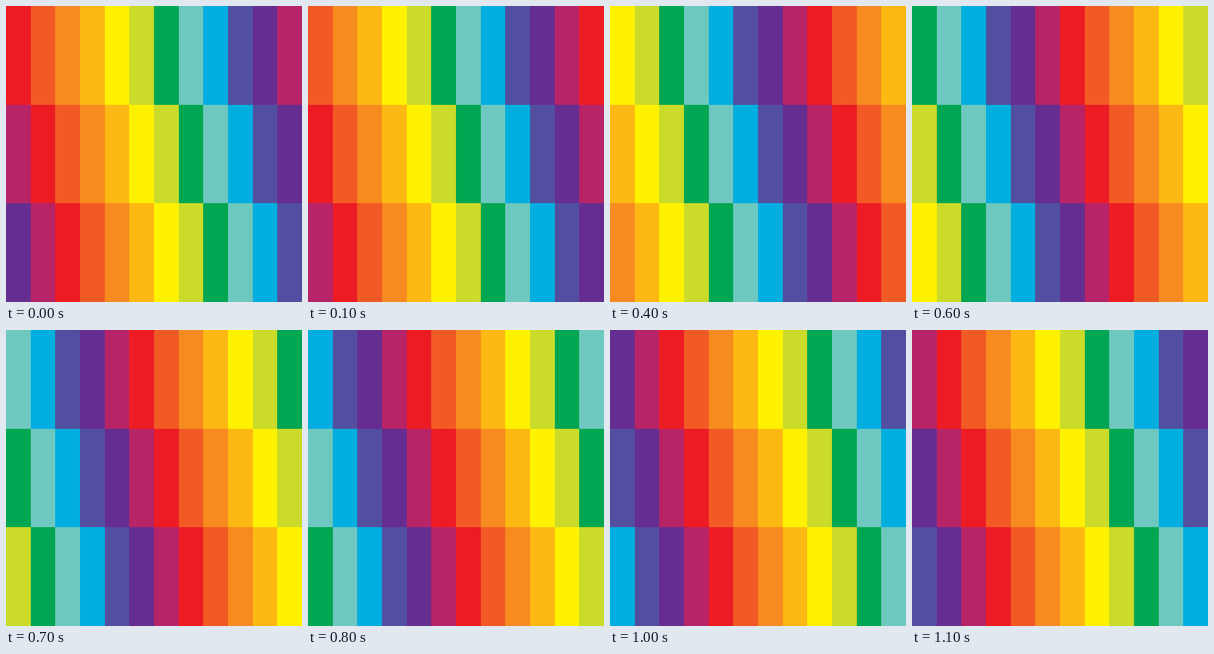
Animation of 500x500 px, one loop 1200 ms. Source, as an HTML page with a canvas:

```html
<!DOCTYPE html>
<html lang="en">
<head>
<meta charset="utf-8">
<title>Rainbow shift</title>
<style>
  html, body { margin: 0; width: 100%; height: 100%; overflow: hidden; }
  canvas { display: block; }
</style>
</head>
<body>
<canvas id="stage" width="500" height="500"></canvas>
<script>
const SIZE = 500, ROWS = 3, STEP_MS = 100;
const colors = [
  '#ed1c24', '#f15a24', '#f68b1f', '#fdb813', '#fff200', '#cadb2a',
  '#00a651', '#6dc8bf', '#00aee0', '#524fa1', '#662d91', '#b72467'
];
const count = colors.length;
const ctx = document.getElementById('stage').getContext('2d');
const edge = (i, n) => Math.round(i * SIZE / n);

// Each step moves the stripes one place left; each row sits one place further right.
function draw(step) {
  for (let row = 0; row < ROWS; row++) {
    const y = edge(row, ROWS), h = edge(row + 1, ROWS) - y;
    for (let col = 0; col < count; col++) {
      const x = edge(col, count), w = edge(col + 1, count) - x;
      ctx.fillStyle = colors[(col - row + step + count) % count];
      ctx.fillRect(x, y, w, h);
    }
  }
}

const start = performance.now();
function tick() {
  draw(Math.floor((performance.now() - start) / STEP_MS) % count);
  requestAnimationFrame(tick);
}
tick();
</script>
</body>
</html>
```
